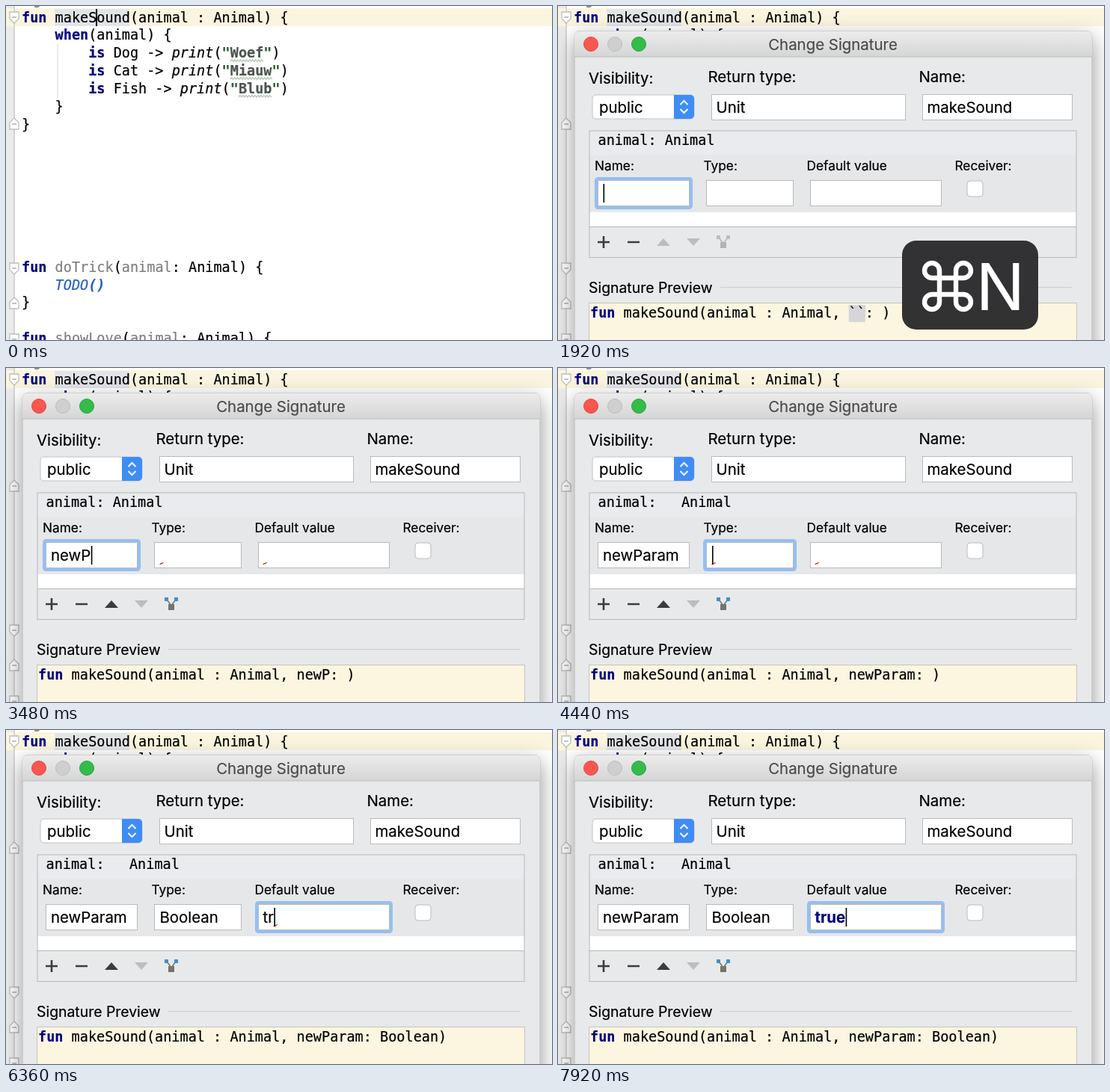
An HTML page that plays this animation: 730x447 px, repeating every 8000 ms.

```html
<!DOCTYPE html>
<html lang="en">
<head>
<meta charset="utf-8">
<title>Change Signature</title>
<style>
  html, body { margin: 0; width: 100%; height: 100%; overflow: hidden; background: #fff; }
  svg { display: block; width: 730px; height: 447px; }
  text { --c: #000; white-space: pre; font: 20.4px Inter, Roboto, sans-serif; font-optical-sizing: none; }
  text, tspan { fill: var(--c); stroke: var(--c); stroke-width: .2; }
  .code { font: 18.52px "DejaVu Sans Mono", "Liberation Mono", monospace; }
  .k { font-weight: 700; --c: #000080; }
  .i { font-style: italic; }
  .s { font-weight: 700; --c: #4c5450; }
  .q { font-weight: 700; --c: #2c5f38; }
  .u { --c: #808080; }
  .todo { font-style: italic; --c: #2a5fbd; }
  .b { font-weight: 700; }
  .title { text-anchor: middle; --c: #4b4b4b; }
  .small { font-size: 17.3px; }
  .key { font-size: 86px; --c: #fff; }
  .item { font-size: 21px; --c: #66686a; }
  .tail { --c: #a2a4a6; }
  .badge { font-size: 13px; font-weight: 600; text-anchor: middle; --c: #44586b; }
  .box { fill: #fff; stroke: #b9babb; }
  .line { fill: none; stroke: #b6b7b8; }
</style>
</head>
<body>
<svg id="stage" viewBox="0 0 730 447"></svg>
<script>
const LOOP = 8000, CW = 11.15, ROW = 23.86, BASE = 21.6;
const OPEN = 360, ADD = 1680, READY = 2160, TAB1 = 4260, POPUP = 4920, PICK = 5520, TAB2 = 5880, BOLD = 6840;
const NAME_KEYS = [2760, 3000, 3180, 3360, 3600, 3780, 3960, 4080];
const TYPE_KEYS = [4560, 4740, 4980];
const VALUE_KEYS = [6120, 6300, 6540, 6720];
const EVENTS = [0, ADD, ...NAME_KEYS, TAB1, ...TYPE_KEYS, PICK, TAB2, ...VALUE_KEYS, BOLD];
const FIELDS = [[53.5, 122, 60], [198.5, 116, 205.5], [337.5, 175, 343.5]];

const span = (cls, s) => `<tspan class="${cls}">${s}</tspan>`;
const text = (x, y, s, attrs = '') => `<text x="${x}" y="${y}" ${attrs}>${s}</text>`;
const rect = (x, y, w, h, attrs = '') => `<rect x="${x}" y="${y}" width="${w}" height="${h}" ${attrs}/>`;
const path = (d, attrs = '') => `<path d="${d}" ${attrs}/>`;
const circle = (x, y, r, attrs = '') => `<circle cx="${x}" cy="${y}" r="${r}" ${attrs}/>`;
const group = (id, body, attrs = '') => `<g id="${id}" ${attrs}>${body}</g>`;
const code = (x, y, s, attrs = '') => text(x, y, s, `class="code" ${attrs}`);

function wave(col, row, n) {
  const x = 21 + col * CW, y = BASE + 5 + row * ROW;
  return path(`M${x} ${y}` + 'l2 -2.5l2 2.5'.repeat(Math.round(n * CW / 4)), 'fill="none" stroke="#b3c3b3" stroke-width="1.2"');
}

function fold(y, up) {
  return path('M-6 -7H6V2L0 8L-6 2Z',
    `transform="translate(11 ${y}) scale(1 ${up ? -1 : 1})" fill="#fff" stroke="#bdbdbd" stroke-width="1.3"`)
    + path(`M8 ${y}h6`, 'stroke="#aaa" stroke-width="1.4"');
}

function editor() {
  const line = (row, s) => code(21, BASE + row * ROW, s);
  const sound = (row, type, word) => {
    const col = 22 + type.length;
    return wave(col, row, word.length) + line(row, '        ' + span('k', 'is') + ` ${type} -&gt; ` + span('i', 'print')
      + '(' + span('q', '"') + span('s', word) + span('q', '"') + ')');
  };
  const stub = (row, name) => line(row, span('k', 'fun') + ' ' + span('u', name) + '(' + span('u', 'animal') + ': Animal) {');
  return rect(0, 0, 730, 447, 'fill="#fff"')
    + rect(0, 0, 11, 447, 'fill="#ebebeb"')
    + rect(0, 3, 730, 24, 'fill="#fbf5df"')
    + path('M11 0V447', 'stroke="#c6c6c6" stroke-width="1.4"')
    + rect(65, 4, 100, 23, 'fill="#e2e4e8"')
    + path('M69 51V123', 'stroke="#d8d8d8"')
    + code(36, BASE - ROW, 'g', 'style="--c:#777"')
    + line(0, span('k', 'fun') + ' makeSound(animal : Animal) {')
    + line(1, '    ' + span('k', 'when') + '(animal) {')
    + sound(2, 'Dog', 'Woef') + sound(3, 'Cat', 'Miauw') + sound(4, 'Fish', 'Blub')
    + line(5, '    }') + line(6, '}')
    + stub(14, 'doTrick')
    + line(15, '    ' + span('todo', 'TODO') + span('todo b', '()'))
    + line(16, '}')
    + stub(18, 'showLove')
    + fold(15) + fold(158, true) + fold(351) + fold(398, true) + fold(446)
    + rect(120, 4, 2, 23, 'id="edCaret"');
}

function toolbar() {
  return path('M53 316h16M61 308v16M93 316h16', 'stroke="#3c3c3c" stroke-width="2.6"')
    + path('M132 321l9 -10l9 10Z', 'id="up"')
    + path('M172 311l9 10l9 -10Z', 'fill="#bdbdbd"')
    + group('filter', path('M215 310L221 318L227 310', 'fill="none" stroke="#777" stroke-width="1.6"')
      + rect(217, 316, 8, 8, 'fill="#77736c"')
      + group('dots', rect(212, 307, 5, 5) + rect(225, 307, 5, 5)));
}

function dialog() {
  const light = (x, fill, stroke) => circle(x, 51, 9.5, `fill="${fill}" stroke="${stroke}"`);
  const fields = FIELDS.map(([x, w, tx], i) => rect(x, 233.5, w, 34, 'class="box"')
    + text(tx, 258, '', `id="field${i}"`)
    + path('', `id="mark${i}" fill="none" stroke="#e03c32" stroke-width="1.4"`)).join('');
  return rect(22, 33.5, 692, 480, 'rx="7" fill="#e8e9ea" stroke="#b4b4b4" filter="url(#shadow)"')
    + path('M22 68V40.500a7 7 0 0 1 7 -7H707a7 7 0 0 1 7 7V68Z', 'fill="url(#title)"')
    + path('M22 68H714', 'stroke="#bcbcbc"')
    + light(44, '#f9564f', '#df4741') + light(76, '#cfcfd0', '#bdbdbe') + light(108, '#35bb4a', '#2aa23c')
    + text(367.5, 59, 'Change Signature', 'class="title"')
    + text(41, 104, 'Visibility:') + text(200.5, 102, 'Return type:') + text(482.5, 102, 'Name:')
    + rect(46, 119, 136, 32, 'rx="5" fill="#fff" stroke="#c2c2c2"')
    + path('M155 119H177a5 5 0 0 1 5 5V146a5 5 0 0 1 -5 5H155Z', 'fill="#3e8df6"')
    + path('M163.500 132l5 -5l5 5M163.500 138l5 5l5 -5', 'fill="none" stroke="#fff" stroke-width="2"')
    + text(55, 143, 'public')
    + rect(205.5, 118.5, 259, 34, 'class="box"') + text(211.5, 143, 'Unit')
    + rect(487.5, 118.5, 200, 34, 'class="box"') + text(493.5, 143, 'makeSound')
    + rect(42, 167, 651, 128, 'fill="#fff"')
    + rect(42, 167, 651, 32, 'id="row"')
    + code(53.5, 186, '', 'id="param"')
    + group('panel', rect(42, 199, 651, 77, 'fill="#e6e7e9"')
      + [[49, 'Name:'], [194.5, 'Type:'], [332.5, 'Default value'], [530.5, 'Receiver:']]
        .map(([x, s]) => text(x, 220, s, 'class="small"')).join('')
      + rect(0, 231.5, 0, 38, 'id="ring" rx="2" fill="none" stroke="#94bff1" stroke-width="5"')
      + fields
      + rect(0, 238, 1.6, 25, 'id="caret"')
      + rect(547, 234, 21, 21, 'rx="4" class="box"'))
    + rect(42, 167, 651, 169.5, 'class="line"') + path('M42 295.500H693', 'class="line"')
    + toolbar()
    + text(41, 384, 'Signature Preview', 'style="font-size:19.4px"')
    + path('M217 376.500H687', 'stroke="#cbcbcb"')
    + rect(41.5, 397.5, 652, 80, 'fill="#fcf5df" stroke="#c4c4c0"')
    + rect(43 + 31 * CW, 400, 2 * CW, 23, 'id="ticks" fill="#d6d6d8"')
    + code(43, 417, '', 'id="preview"');
}

function popup() {
  const items = [
    ['Boolean', 'kotlin', 'C'], ['BootstrapMethodError', 'java.lang', ''],
    ['BooleanArray', 'kotlin', 'C'], ['BooleanIterator', 'kotlin.collections', 'C'],
    ['BooleanSupplier', 'java.util.function', 'I'], ['BooleanAttribute', 'android.icu.text.DateFormat', 'E'],
    ['BoolRes', 'android.support.annotation', '@']
  ];
  const item = ([name, pack, letter], i) => {
    const y = 278.5 + i * 28.7, grey = letter === 'I' || letter === '@';
    return circle(165, y, 10, `fill="${grey ? '#c6c7c8' : '#93c2e6'}"`)
      + (letter ? text(165, y + 4.7, letter, 'class="badge"')
        : path(`M167 ${y - 6}l-7 7h4l-1 5l7 -7h-4Z`, 'fill="#44586b"'))
      + (letter === 'C' ? rect(167, y + 2, 9, 9, 'fill="#6aa9de" stroke="#eef0f2"') : '')
      + rect(187, y - 1, 9, 7, 'fill="none" stroke="#a5a7a9" stroke-width="1.5"')
      + path(`M184 ${y - 2}v-2a2.500 2.500 0 0 1 5 0v3`, 'fill="none" stroke="#a5a7a9" stroke-width="1.5"')
      + text(205, y + 7, `${name} ` + span(i ? 'tail' : '', `(${pack})`), 'class="item"');
  };
  return rect(148, 263, 600, 200, 'fill="#e5e6e7" stroke="#b9bdc1" filter="url(#soft)"')
    + rect(148, 263.5, 600, 28.5, 'fill="#99b0c5"')
    + items.map(item).join('');
}

function overlay() {
  const a = 11, r = 10, b = a + r;
  const loop = [0, 90, 180, 270].map(deg =>
    path(`M${a} 0V${b}A${r} ${r} 0 1 0 ${b} ${a}H0`, `transform="rotate(${deg})"`)).join('');
  return rect(460, 314, 220, 119, 'id="plate" rx="19" fill="#29292b" fill-opacity=".95"')
    + `<g transform="translate(521 375)" fill="none" stroke="#fff" stroke-width="6.4">${loop}</g>`
    + text(559, 407, '', 'id="key" class="key"');
}

const stage = document.getElementById('stage');
stage.innerHTML = `<defs>
  <linearGradient id="title" x2="0" y2="1"><stop stop-color="#ececec"/><stop offset="1" stop-color="#d5d5d6"/></linearGradient>
  <filter id="shadow" x="-20%" y="-20%" width="140%" height="140%"><feDropShadow dx="0" dy="10" stdDeviation="14" flood-opacity=".42"/></filter>
  <filter id="soft"><feDropShadow dx="0" dy="3" stdDeviation="5" flood-opacity=".3"/></filter>
</defs>` + editor() + group('dialog', dialog()) + group('popup', popup()) + group('overlay', overlay());

const el = {};
stage.querySelectorAll('[id]').forEach(e => el[e.id] = e);
const set = (id, attrs) => { for (const k in attrs) el[id].setAttribute(k, attrs[k]); };
const show = (id, on) => set(id, { visibility: on ? 'inherit' : 'hidden' });
const write = (id, s) => { if (el[id].last !== s) el[id].innerHTML = el[id].last = s; };
const clamp = v => Math.max(0, Math.min(1, v));
const typed = (s, keys, t) => s.slice(0, keys.filter(k => k <= t).length);
const nameAt = t => typed('newParam', NAME_KEYS, t);
const typeAt = t => t >= PICK ? 'Boolean' : typed('Boo', TYPE_KEYS, t);

function render(t) {
  const added = t >= ADD;
  const last = Math.max(...EVENTS.filter(e => e <= t));
  const blink = (t - last) % 1000 < 500;

  show('edCaret', t < OPEN && blink);
  show('dialog', t >= OPEN);
  show('panel', added);
  set('row', { fill: added ? '#e9ebee' : '#0550d2' });
  el.param.style.setProperty('--c', added ? '#000' : '#fff');

  const values = [nameAt(t), typeAt(t), typed('true', VALUE_KEYS, t)];
  const focus = t < TAB1 ? 0 : t < TAB2 ? 1 : 2;
  const wrong = [false, t < PICK, t < BOLD];
  write('param', 'animal: '.padEnd(Math.max(6, values[0].length) + 2) + 'Animal');
  set('field2', { class: t >= BOLD ? 'k' : '' });
  values.forEach((s, i) => {
    write('field' + i, s);
    const end = FIELDS[i][2] + (s ? el['field' + i].getComputedTextLength() : 0);
    set('mark' + i, { d: `M${end} 263l2 -1.500l1 .5l2 -2` });
    show('mark' + i, added && wrong[i] && t >= 2880);
    if (i === focus) set('caret', { x: end + .5 });
  });
  show('caret', added && blink);
  const [fx, fw] = FIELDS[focus];
  set('ring', { x: fx - 2, width: fw + 4 });

  const off = added && t < READY;
  set('up', { fill: t >= READY ? '#3c3c3c' : '#bdbdbd' });
  set('filter', { opacity: off ? .45 : 1 });
  set('dots', { fill: off ? '#8a8a8a' : '#3f8fd0' });

  // The preview trails the typing a little.
  const name = nameAt(t - 100);
  show('ticks', added && !name);
  write('preview', span('k', 'fun') + ' makeSound(animal : Animal'
    + (added ? `, ${name || '``'}: ${typeAt(t - 100)}` : '') + ')');

  const fade = clamp((t - POPUP) / 127) * clamp((PICK + 120 - t) / 120);
  set('popup', { opacity: fade });
  show('popup', fade > 0);

  set('overlay', { opacity: clamp((t - 240) / 120) * clamp((3120 - t) / 240) });
  set('plate', { width: added ? 182 : 220 });
  write('key', added ? 'N' : 'F6');
}

let start;
function tick(now) {
  start ??= now;
  render((now - start) % LOOP);
  requestAnimationFrame(tick);
}
render(0);
requestAnimationFrame(tick);
</script>
</body>
</html>
```
